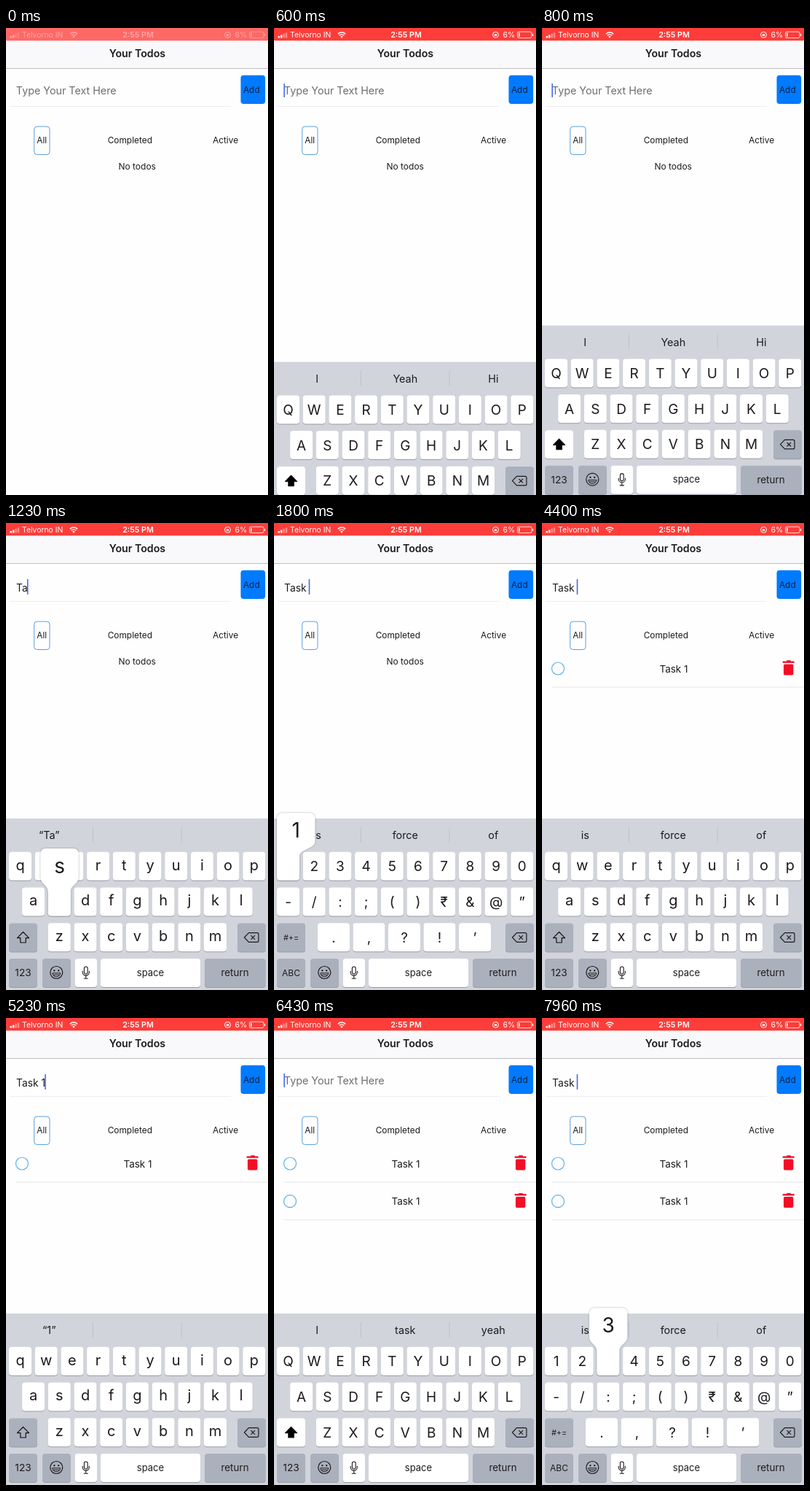
Write an HTML page that moves like this. It is 360x640 px and loops after 8000 ms.

```html
<!DOCTYPE html>
<html lang="en">
<head>
<meta charset="utf-8">
<title>Your Todos</title>
<style>
  html, body { margin: 0; width: 100%; height: 100%; overflow: hidden; background: #fdfdfd; }
  svg { display: block; width: 360px; height: 640px; font-family: Inter, Roboto, sans-serif; }
</style>
</head>
<body>
<svg id="stage" viewBox="0 0 360 640"></svg>
<script>
const LOOP = 8000;
const stage = document.getElementById('stage');
const measure = document.createElement('canvas').getContext('2d');
measure.font = '13.8px Inter, Roboto, sans-serif';

const ramp = (t, from, to) => Math.min(1, Math.max(0, (t - from) / (to - from)));

// Each step changes part of the app state from its time on.
const steps = [
  [0, { text: '', todos: 0, keys: 'upper', hints: ['I', 'Yeah', 'Hi'], popup: '' }],
  [960, { popup: 'T' }],
  [1060, { popup: '', text: 'T', keys: 'lower', hints: ['“T”', '', ''] }],
  [1100, { popup: 'a' }],
  [1200, { popup: '', text: 'Ta', hints: ['“Ta”', '', ''] }],
  [1230, { popup: 's' }],
  [1320, { popup: '', text: 'Tas', hints: ['“Tas”', '', ''] }],
  [1350, { popup: 'k' }],
  [1430, { popup: '', text: 'Task', hints: ['“Task”', '', ''] }],
  [1530, { text: 'Task ', hints: ['is', 'force', 'of'] }],
  [1620, { keys: 'digits' }],
  [1800, { popup: '1' }],
  [2130, { popup: '', text: 'Task 1', hints: ['“1”', '', ''] }],
  [2880, { text: '', todos: 1, hints: ['I', 'task', 'yeah'] }],
  [4130, { text: 'Task ', keys: 'lower', hints: ['is', 'force', 'of'] }],
  [4500, { keys: 'digits' }],
  [4650, { popup: '1' }],
  [4830, { popup: '', text: 'Task 1', keys: 'lower', hints: ['“1”', '', ''] }],
  [6160, { text: '', todos: 2, keys: 'upper', hints: ['I', 'task', 'yeah'] }],
  [7400, { text: 'Task ', keys: 'lower', hints: ['is', 'force', 'of'] }],
  [7700, { keys: 'digits' }],
  [7950, { popup: '3' }]
];
const presses = [[2730, 2880], [5760, 6160]];
const caretGaps = [[-200, 430], [3400, 3930], [6700, 7230]];

const layouts = {
  upper: ['QWERTYUIOP', 'ASDFGHJKL', 'ZXCVBNM'],
  lower: ['qwertyuiop', 'asdfghjkl', 'zxcvbnm'],
  digits: ['1234567890', '-/:;()₹&@”', '.,?!’']
};

const escape = s => s.replace(/&/g, '&amp;');

// y is the middle of the capital letters.
const label = (x, y, s, size, attrs = '') =>
  `<text x="${x}" y="${y + size * .364}" font-size="${size}" fill="#1b1b1e" text-anchor="middle" ${attrs}>${escape(s)}</text>`;
const left = 'style="text-anchor:start"';
const rect = (x, y, w, h, fill, r = 0, attrs = '') =>
  `<rect x="${x}" y="${y}" width="${w}" height="${h}" rx="${r}" fill="${fill}" ${attrs}/>`;
const line = (d, width = 1.2, color = '#1b1b1e', attrs = '') =>
  `<path d="${d}" fill="none" stroke="${color}" stroke-width="${width}" ${attrs}/>`;
const key = (cx, cy, w, fill = '#fff') =>
  rect(cx - w / 2, cy - 18.5, w, 39, '#979ba3', 4) + rect(cx - w / 2, cy - 19.5, w, 39, fill, 4);

function statusBar(t) {
  const k = ramp(t, 0, 230);
  let icons = '';
  for (let i = 0; i < 4; i++)
    icons += rect(5.5 + i * 3.4, 11 - i * 1.6, 2.5, 2.5 + i * 1.6, '#fff', .5, i > 1 ? 'opacity=".4"' : '');
  icons += line('M87.8 8.2a7.4 7.4 0 0 1 10.4 0M89.7 10.3a4.7 4.7 0 0 1 6.6 0', 1.5, '#fff')
    + '<path d="M93 13.8l-1.8-2a2.6 2.6 0 0 1 3.6 0z" fill="#fff"/>'
    + '<circle cx="304.5" cy="9.3" r="4" fill="none" stroke="#fff"/>' + rect(302.8, 8.2, 3.4, 2.8, '#fff', .5)
    + rect(334.5, 5.2, 19.5, 8.4, 'none', 2, 'stroke="#fff" stroke-width=".8"')
    + rect(336, 6.7, 1.6, 5.4, '#fff') + rect(355, 7.8, 1.2, 3.2, '#fff', .6);
  const white = 'style="fill:#fff"';
  return rect(0, 0, 360, 17.3, '#fd3d39') + rect(0, 0, 360, 17.3, '#fff', 0, `opacity="${.22 * (1 - k)}"`)
    + `<g opacity="${.4 + .6 * k}">${icons}`
    + label(22, 9.5, 'Telvorno IN', 10.4, 'style="fill:#fff;text-anchor:start"')
    + label(181.5, 9.5, '2:55 PM', 10.7, white + ' font-weight="600"')
    + label(323, 9.5, '6%', 10.5, white) + '</g>';
}

function inputRow(t, { text }) {
  let button = 1;
  for (const [down, up] of presses)
    button -= .8 * ramp(t, down, down + 150) * (1 - ramp(t, up, up + 250));
  let caret = 1;
  for (const [off, on] of caretGaps)
    caret -= ramp(t, off, off + 120) * (1 - ramp(t, on, on + 90));
  const caretX = 13.3 + measure.measureText(text).width;
  return rect(5, 107, 304, 1, '#ededf0')
    + (text ? label(14, 89.3, text, 13.8, left)
            : label(13.8, 86, 'Type Your Text Here', 14.3, 'style="text-anchor:start;fill:#6d6d72"'))
    + rect(caretX, text ? 77 : 76, 1.6, text ? 21 : 19, '#4669e8', .6, `opacity="${caret}"`)
    + `<g opacity="${button}">${rect(322.5, 64.8, 33.7, 39.2, '#007aff', 4)}${label(337.3, 84.3, 'Add', 11.9, 'style="fill:#0a2341"')}</g>`;
}

function todoRow(i) {
  return `<g transform="translate(0 ${i * 51.6})">`
    + '<circle cx="22" cy="199.5" r="8.5" fill="none" stroke="#5cb0e6" stroke-width="1.2"/>'
    + label(181, 199.7, 'Task 1', 13.5)
    + rect(336, 188.3, 6, 2.5, '#f30d27', .8) + rect(330.7, 189.5, 16, 2.3, '#f30d27')
    + rect(332, 193.5, 13.4, 15, '#f30d27', 1.8)
    + rect(13, 224.5, 347, 1, '#e7e7ea') + '</g>';
}

function popupKey(cx, cy, char) {
  const l = Math.max(cx - 26, 4), r = l + 52.5, kl = cx - 15.5, kr = cx + 15.5;
  const top = cy - 73, bulge = cy - 34, neck = cy - 13, foot = cy + 19.5;
  const mid = (bulge + neck) / 2;
  return `<path fill="#fff" style="filter:drop-shadow(0 .5px 1.2px #0005)" d="M${l + 8} ${top}H${r - 8}q8 0 8 8V${bulge}`
    + `C${r} ${mid} ${kr} ${mid} ${kr} ${neck}V${foot - 4}q0 4-4 4H${kl + 4}q-4 0-4-4V${neck}`
    + `C${kl} ${mid} ${l} ${mid} ${l} ${bulge}V${top + 8}q0-8 8-8z"/>`
    + label((l + r) / 2, cy - 49, char, 28);
}

function keyboard(t, { keys, hints, popup }) {
  // Critically damped spring.
  const w = Math.max(0, t - 445) * .01826;
  const shift = 236 * (1 + w) * Math.exp(-w);
  const digits = keys === 'digits', lower = keys === 'lower', gray = '#abb1bc';
  let out = rect(0, 405, 360, 236, '#d1d4db') + rect(119, 417, 1, 21, '#bec2c9') + rect(240.5, 417, 1, 21, '#bec2c9');
  hints.forEach((hint, i) => out += label(59.3 + i * 121, 428, hint, 14.4));

  let pressed = '';
  layouts[keys].forEach((row, r) => {
    const wide = digits && r === 2;
    const start = r === 0 || (digits && r === 1) ? 19.5 : r === 1 ? 37.6 : wide ? 82 : 73.3;
    [...row].forEach((char, i) => {
      const cx = start + i * (wide ? 48.5 : 35.7), cy = 470.3 + r * 48.7;
      if (char === popup) pressed = popupKey(cx, cy, char);
      out += key(cx, cy, wide ? 44 : 31);
      if (char !== popup) out += label(cx, cy - (lower ? 2 : 0), char, lower ? 20 : 19);
    });
  });

  out += key(23.5, 568, 39, keys === 'upper' ? '#fff' : gray);
  out += digits ? label(23.5, 568, '#+=', 10.8)
    : line('M23.5 560.5l8 8.2h-4.3v6.3h-7.4v-6.3h-4.3z', 1.2, '#111', `stroke-linejoin="round" style="fill:${lower ? 'none' : '#000'}"`);
  out += key(337.5, 568, 39, gray)
    + line('M327.5 568l6-6.3h11.5q2 0 2 2v8.6q0 2-2 2h-11.5zM336.5 565.2l5.6 5.6m0-5.6l-5.6 5.6', 1.2, '#1b1b1e', 'stroke-linejoin="round"');

  const y = 616.5;
  out += key(23.5, y, 39, gray) + label(23.5, y, digits ? 'ABC' : '123', digits ? 12 : 13.7)
    + key(69.5, y, 39, gray) + key(109.8, y, 30.5) + key(198.5, y, 137) + key(315, y, 84, gray)
    + label(198.5, y - .5, 'space', 13) + label(314.5, y - .5, 'return', 13.4)
    + '<circle cx="69.3" cy="616" r="8.5" fill="none" stroke="#1b1b1e" stroke-width="1.2"/>'
    + '<circle cx="66.4" cy="613.3" r="1.1"/><circle cx="72.2" cy="613.3" r="1.1"/>'
    + line('M63.8 616.8h11a5.5 5 0 0 1-11 0zM65 619.2h8.6', 1)
    + rect(107.4, 608, 4.8, 10, 'none', 2.4, 'stroke="#1b1b1e" stroke-width="1.1"')
    + line('M105.2 614v1.5a4.6 4.6 0 0 0 9.2 0V614M109.8 620.2v4M106.8 624.2h6', 1.1);
  return `<g transform="translate(0 ${shift.toFixed(2)})">${out}${pressed}</g>`;
}

function scene(t) {
  const state = {};
  for (const [time, change] of steps) if (time <= t) Object.assign(state, change);
  let out = rect(0, 0, 360, 640, '#fefefe') + rect(0, 17, 360, 38, '#f9f9fb') + rect(0, 55, 360, 1, '#bdbdc1')
    + statusBar(t) + label(180.4, 34.8, 'Your Todos', 14.2, 'font-weight="600"')
    + inputRow(t, state)
    + rect(38.7, 135, 21.3, 38.5, 'none', 4, 'stroke="#5c9fdd"')
    + label(49.2, 154, 'All', 11.8) + label(170.3, 154, 'Completed', 11.9) + label(301.5, 154, 'Active', 11.9);
  if (!state.todos) out += label(180.2, 189.8, 'No todos', 12);
  for (let i = 0; i < state.todos; i++) out += todoRow(i);
  return out + keyboard(t, state);
}

let shown = '';
function frame() {
  const next = scene(performance.now() % LOOP);
  if (next !== shown) stage.innerHTML = shown = next;
  requestAnimationFrame(frame);
}
frame();
</script>
</body>
</html>
```
